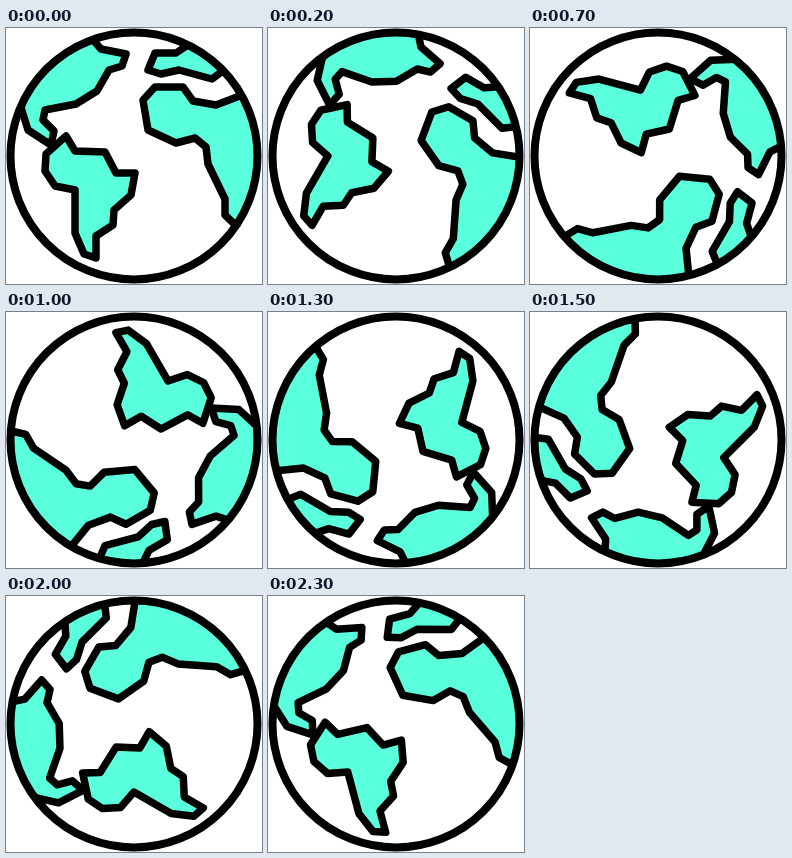
These frames come from a looping animation (256 by 256 pixels, 2400 ms). An HTML page with a canvas:

```html
<!DOCTYPE html>
<html lang="en">
<head>
<meta charset="utf-8">
<title>Spinning globe</title>
<style>
  html, body { margin: 0; width: 100%; height: 100%; overflow: hidden; background: #fff; }
  canvas { display: block; width: 256px; height: 256px; }
</style>
</head>
<body>
<canvas id="stage" width="256" height="256"></canvas>
<script>
const ctx = document.getElementById('stage').getContext('2d');
const LOOP = 2400, STEPS = 24, SIZE = 256, MID = SIZE / 2, RADIUS = 123.5;

// Coast corners at rest; those beyond the rim are clipped away.
const northAmerica = new Path2D(
  'M80 4 95 21 120 26 116 38 103 42 91 63 70 76 39 82 37 92 48 103 45 117 22 102 12 70 0 0Z');
const europe = new Path2D(
  'M200 0 182 17 170 25 149 25 142 42 155 46 173 42 206 51 222 39Z');
const africa = new Path2D(
  'M260 58 210 77 187 73 177 59 149 59 137 72 142 102 170 115 189 110 200 119 202 136 219 171 219 187 270 236Z');
const southAmerica = new Path2D(
  'M60 108 69 123 99 124 110 145 129 145 125 167 108 182 107 197 90 208 90 230 78 226 69 205 69 162 49 158 39 143 40 126Z');
const lands = [northAmerica, europe, africa, southAmerica];

const disc = new Path2D();
disc.arc(MID, MID, RADIUS, 0, Math.PI * 2);

function spin(turns) {
  ctx.translate(MID, MID);
  ctx.rotate(turns * Math.PI * 2);
  ctx.translate(-MID, -MID);
}

function draw(time) {
  const step = Math.floor((time % LOOP) / LOOP * STEPS);
  ctx.fillStyle = '#fff';
  ctx.fillRect(0, 0, SIZE, SIZE);

  ctx.save();
  ctx.clip(disc);
  spin(step / STEPS);
  ctx.lineJoin = 'round';
  ctx.lineWidth = 7.5;
  ctx.fillStyle = '#5affdc';
  for (const land of lands) {
    ctx.fill(land);
    ctx.stroke(land);
  }
  ctx.restore();

  ctx.lineWidth = 8;
  ctx.stroke(disc);
}

const start = performance.now();
function tick() {
  draw(performance.now() - start);
  requestAnimationFrame(tick);
}
tick();
</script>
</body>
</html>
```
